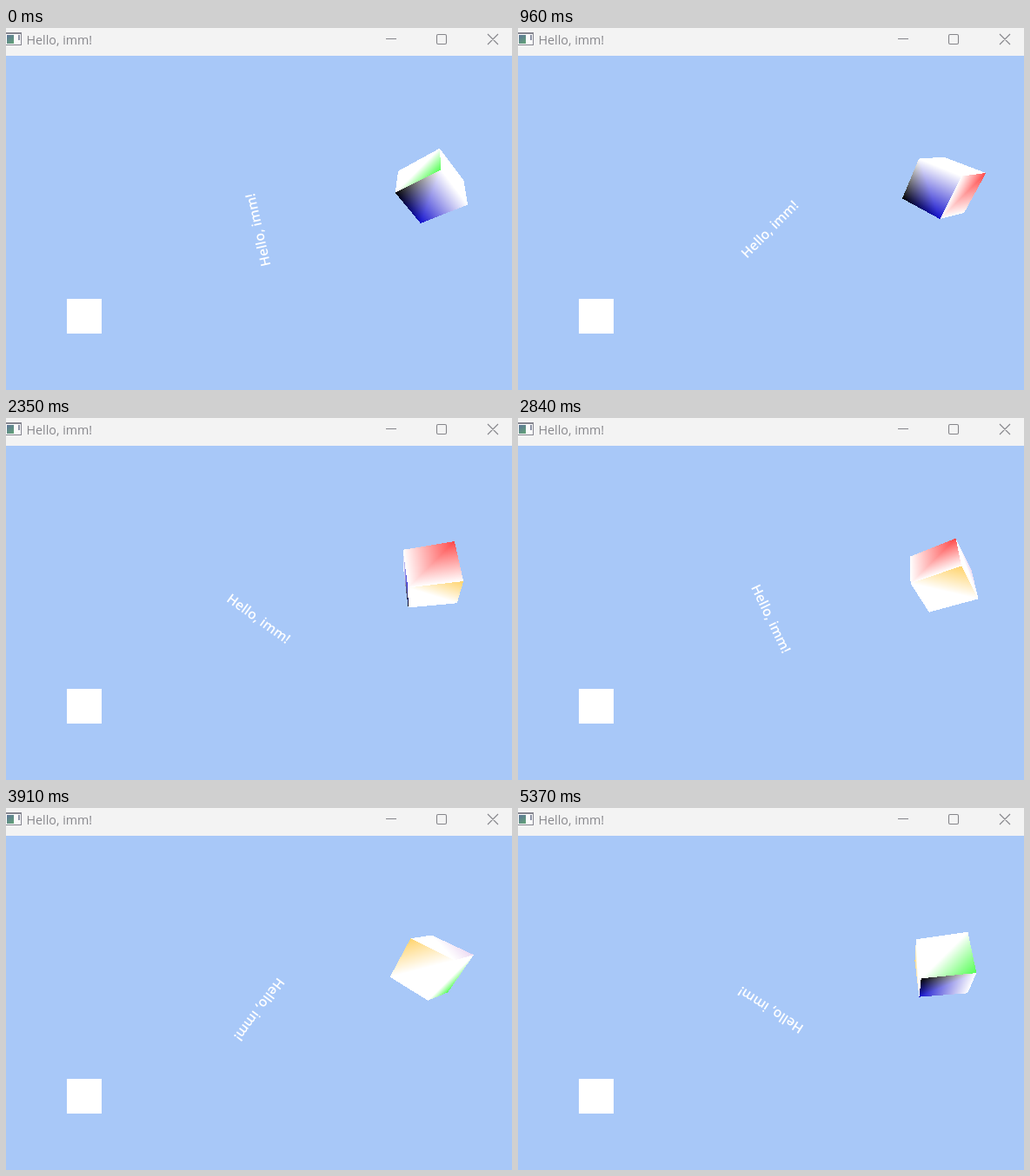
An HTML page with a canvas for the animation above (5450 ms loop, 582 by 417 pixels).

```html
<!DOCTYPE html>
<html>
<head>
<meta charset="utf-8">
<style>
  html, body { margin: 0; width: 582px; height: 417px; overflow: hidden; }
  canvas { display: block; }
</style>
</head>
<body>
<canvas id="stage" width="582" height="417"></canvas>
<script>
const ctx = document.getElementById('stage').getContext('2d');
const LOOP = 5450;
const LONG_STEPS = [12, 18, 24, 29, 36, 43, 47, 54, 60]; // these last 90 ms, others 80

// Perspective view: focal length, screen centre and cube centre (unit cube)
const FOCAL = 340, VIEW = [291, 224.5], CUBE = [3.91, 0.835, -6.76];

const WHITE = [255, 255, 255], RED = [255, 72, 72], YELLOW = [255, 211, 108],
  GREEN = [84, 255, 84], BLUE = [18, 16, 205], BLACK = [0, 0, 0], LILAC = [236, 216, 242];

// Corner numbers are bits (x = 4, y = 2, z = 1); quads split from first to third corner
const FACES = [
  { corners: [7, 3, 1, 5], colors: [RED, WHITE, WHITE, WHITE] },
  { corners: [1, 0, 4, 5], colors: [WHITE, WHITE, WHITE, YELLOW] },
  { corners: [0, 2, 6, 4], colors: [WHITE, GREEN, WHITE, WHITE] },
  { corners: [1, 3, 2, 0], colors: [BLUE, WHITE, WHITE, BLACK] },
  { corners: [4, 6, 7, 5], colors: [WHITE, LILAC, WHITE, WHITE] },
  { corners: [2, 3, 7, 6], colors: [WHITE, WHITE, WHITE, WHITE] }
];

function stepAt(t) {
  let n = 0, end = 0;
  for (;; n++) {
    end += LONG_STEPS.includes(n) ? 90 : 80;
    if (t < end) return n;
  }
}

// Turn a corner about the axis (-1, -1, 0) and project it
function project(corner, angle) {
  const [x, y, z] = [4, 2, 1].map(bit => corner & bit ? 0.5 : -0.5);
  const c = Math.cos(angle), s = Math.sin(angle) * Math.SQRT1_2;
  const along = (x + y) / 2 * (1 - c);
  const px = x * c - z * s + along + CUBE[0];
  const py = y * c + z * s + along + CUBE[1];
  const w = -1 / (z * c + (x - y) * s + CUBE[2]);
  return { x: VIEW[0] + px * FOCAL * w, y: VIEW[1] - py * FOCAL * w, w };
}

const cross = (a, b, x, y) => (b.x - a.x) * (y - a.y) - (b.y - a.y) * (x - a.x);

function fillTriangle(points, colors) {
  const [a, b, c] = points;
  if (cross(a, b, c.x, c.y) >= 0) return; // faces away
  const xs = points.map(p => p.x), ys = points.map(p => p.y);
  for (let y = Math.floor(Math.min(...ys)); y < Math.max(...ys); y++) {
    for (let x = Math.floor(Math.min(...xs)); x < Math.max(...xs); x++) {
      const u = x + 0.5, v = y + 0.5;
      const k = [cross(b, c, u, v), cross(c, a, u, v), cross(a, b, u, v)];
      if (k.some(e => e > 0)) continue;
      const share = k.map((e, i) => e * points[i].w);
      const sum = share[0] + share[1] + share[2];
      const rgb = [0, 1, 2].map(ch =>
        Math.round(share.reduce((acc, e, i) => acc + e * colors[i][ch], 0) / sum));
      ctx.fillStyle = `rgb(${rgb})`;
      ctx.fillRect(x, y, 1, 1);
    }
  }
}

function drawCube(angle) {
  const points = [0, 1, 2, 3, 4, 5, 6, 7].map(i => project(i, angle));
  for (const { corners, colors } of FACES) {
    for (const tri of [[0, 1, 2], [0, 2, 3]]) {
      fillTriangle(tri.map(i => points[corners[i]]), tri.map(i => colors[i]));
    }
  }
}

function rect(color, x, y, w, h) {
  ctx.fillStyle = color;
  ctx.fillRect(x, y, w, h);
}

function drawWindow() {
  rect('#a8c8f8', 0, 0, 582, 417);
  rect('#f3f3f3', 0, 0, 582, 32);

  // Window icon
  rect('#85858f', 0, 5, 18, 15);
  rect('#fbfbfb', 0, 7, 17, 12);
  const patch = ctx.createLinearGradient(1, 8, 9, 18);
  patch.addColorStop(0, '#5c7398');
  patch.addColorStop(1, '#63a476');
  rect(patch, 1, 8, 8, 10);
  rect('#8d93a5', 14, 8, 2, 6);

  ctx.fillStyle = '#87878c';
  ctx.font = '14.3px "Open Sans", "Noto Sans", sans-serif';
  ctx.textAlign = 'left';
  ctx.fillText('Hello, imm!', 23.5, 19);

  // Minimise, maximise, close
  ctx.strokeStyle = '#85858a';
  ctx.lineWidth = 1.1;
  ctx.beginPath();
  ctx.moveTo(437, 12.5);
  ctx.lineTo(449, 12.5);
  ctx.roundRect(495.5, 7.5, 11, 11, 1.5);
  ctx.moveTo(554, 7);
  ctx.lineTo(566, 19);
  ctx.moveTo(566, 7);
  ctx.lineTo(554, 19);
  ctx.stroke();
}

function drawText(angle) {
  ctx.save();
  ctx.translate(290.5, 232);
  ctx.rotate(angle);
  ctx.fillStyle = '#fff';
  ctx.font = '600 15.6px "Open Sans", "Noto Sans", sans-serif';
  ctx.textAlign = 'center';
  ctx.fillText('Hello, imm!', -0.5, 4.7);
  ctx.restore();
}

let shown = -1;
function tick() {
  const n = stepAt(performance.now() % LOOP);
  if (n !== shown) {
    shown = n;
    const angle = n / 12 - 1.79; // one radian per twelve steps
    drawWindow();
    rect('#fff', 70, 312, 40, 40);
    drawText(angle);
    drawCube(angle);
  }
  requestAnimationFrame(tick);
}
tick();
</script>
</body>
</html>
```
